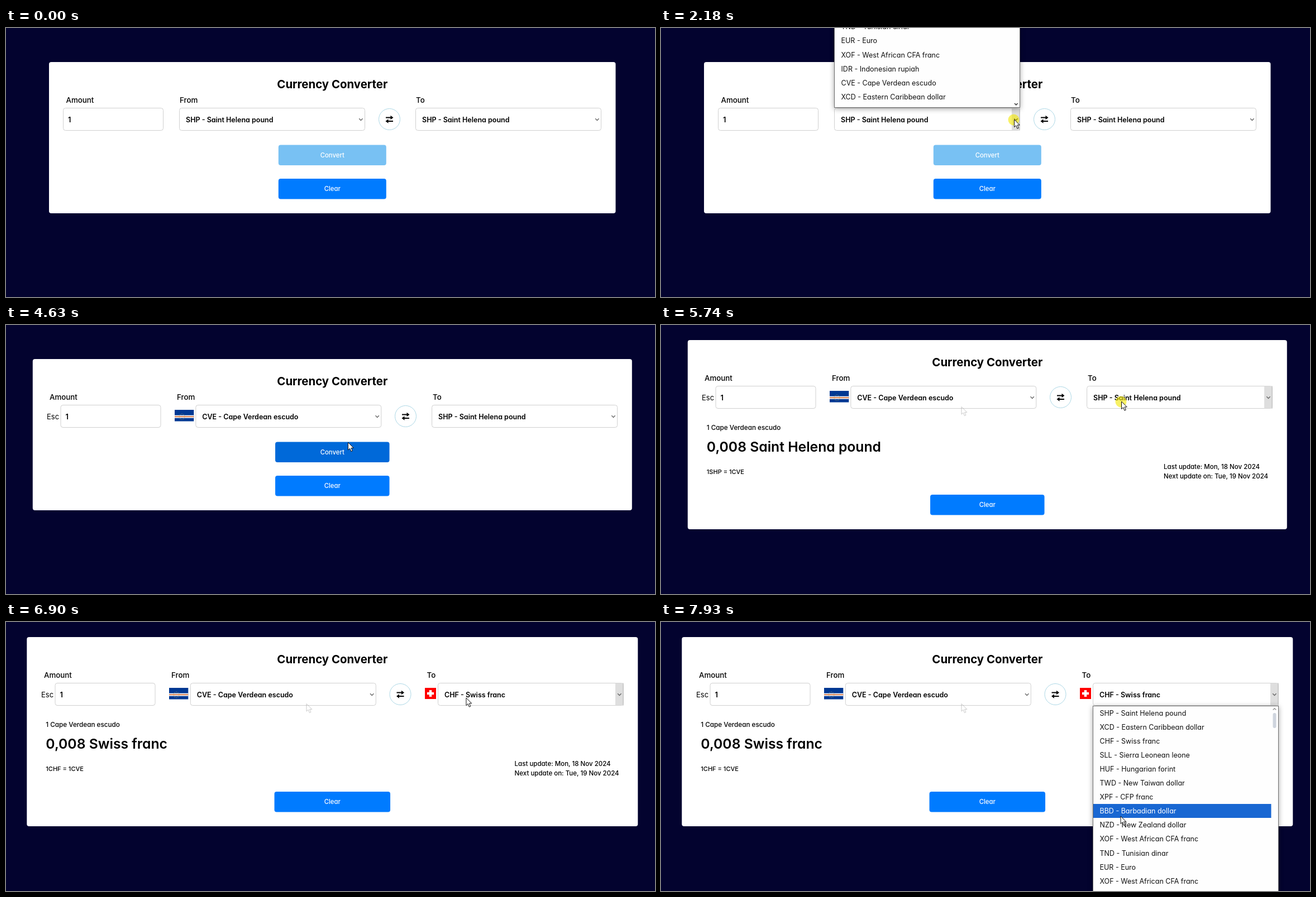
These frames come from a looping animation (1162x482 px, 8 s). An HTML page:

```html
<!DOCTYPE html>
<html lang="en">
<head>
<meta charset="utf-8">
<title>Currency Converter</title>
<style>
  html, body { margin: 0; width: 100%; height: 100%; overflow: hidden; background: #03032f; }
  #stage { display: block; width: 100%; height: 100%; }
  /* cv11 gives the single-storey a */
  text { font-family: Inter, "Open Sans", sans-serif; font-feature-settings: "cv11"; white-space: pre; }
  .menu { filter: drop-shadow(0 2px 5px rgba(0, 0, 0, .35)); }
</style>
</head>
<body>
<svg id="stage" viewBox="0 0 1162 482"></svg>
<script>
const LOOP = 8000;
const BLUE = '#007bff', BLUE_HOVER = '#0069d9', PALE = '#78c1f3';
const ROW = 25.1;

const SHP = 'SHP - Saint Helena pound', CVE = 'CVE - Cape Verdean escudo', CHF = 'CHF - Swiss franc';
const XCD = 'XCD - Eastern Caribbean dollar', XOF = 'XOF - West African CFA franc';
const TND = 'TND - Tunisian dinar', EUR = 'EUR - Euro';
const FROM_ROWS = [TND, EUR, XOF, 'IDR - Indonesian rupiah', CVE, XCD, 'LAK - Lao kip'];
const TO_ROWS = [SHP, XCD, CHF, 'SLL - Sierra Leonean leone', 'HUF - Hungarian forint',
  'TWD - New Taiwan dollar', 'XPF - CFP franc', 'BBD - Barbadian dollar',
  'NZD - New Zealand dollar', XOF, TND, EUR, XOF, 'IDR - Indonesian rupiah'];

// Horizontal layout for each selection
const PLAIN = { left: 77, right: 1091.5, amount: 107.5, input: 102.5, fromLabel: 311, from: 310.5,
  swap: 686.5, toLabel: 734, to: 733.5, button: 193, fromText: SHP, toText: SHP };
const ESCUDO = { left: 47.8, right: 1120.8, amount: 78, input: 98, fromLabel: 306, from: 339.8,
  swap: 715.5, toLabel: 764, to: 762.6, button: 204.5, fromText: CVE, toText: SHP, flag: 302 };
const FRANC = { left: 37.3, right: 1131.3, amount: 68, input: 88, fromLabel: 296, from: 330.3,
  swap: 706, toLabel: 753.5, to: 773.5, button: 207.5, fromText: CVE, toText: CHF, flag: 292, swiss: 750 };

// Pointer moves: start, end, from, bend, to
const MOVES = [
  [520, 1290, [976, 441], [640, 285], [597, 217]],
  [1290, 1980, [597, 217], [606, 180], [632.5, 164]],
  [2400, 2930, [632.5, 164], [590, 100], [520, 82]],
  [4100, 4780, [520, 82], [528, 178], [638, 222]],
  [5000, 5640, [638, 222], [740, 160], [824.5, 137]],
  [6130, 6460, [824.5, 137], [826, 170], [825.5, 208]],
  [6640, 6960, [825.5, 208], [826, 160], [823.5, 130.5]],
  [7650, 7930, [823.5, 130.5], [823, 239], [823, 348]]
];
const CLICKS = [[2050, 2250], [3600, 3730], [4780, 4910], [5670, 5880], [6500, 6630], [7240, 7450]];

const during = (t, a, b) => t >= a && t < b;
const inside = (p, x, y, w, h) => p[0] >= x && p[0] < x + w && p[1] >= y && p[1] < y + h;

function pointer(t) {
  const [a, b, p, q, r] = MOVES.filter(m => t >= m[0]).pop() || MOVES[0];
  const k = Math.max(0, Math.min(1, (t - a) / (b - a)));
  const s = k * k * (3 - 2 * k), u = 1 - s;
  return [0, 1].map(i => u * u * p[i] + 2 * u * s * q[i] + s * s * r[i]);
}

const rect = (x, y, w, h, fill, extra = '') =>
  `<rect x="${x}" y="${y}" width="${w}" height="${h}" fill="${fill}" ${extra}/>`;
// y is the middle of the capitals
const text = (str, x, y, size, weight = 400, fill = '#000', anchor = 'start') =>
  `<text x="${x}" y="${y + size * 0.36}" font-size="${size}" font-weight="${weight}" fill="${fill}" text-anchor="${anchor}">${str}</text>`;
const stroke = (d, color, width) =>
  `<path d="${d}" fill="none" stroke="${color}" stroke-width="${width}"/>`;

function field(x, y, w) {
  return rect(x, y, w, 40, '#fff', 'rx="4" stroke="#d0d0d0"');
}

function select(x, y, label, hot, pressed) {
  let s = field(x, y, 332);
  if (hot) s += rect(x + 317.5, y, 14.5, 40, '#dedede') +
    stroke(`M${x + 331.5} ${y}v40`, '#bbb', 1);
  return s + text(label, x + 11.5, y + 20.5, 12.5, 600) +
    stroke(`M${x + 321.7} ${y + 18.8}l3.2 3.2 3.2-3.2`, pressed ? '#000' : '#666', 1.3);
}

function button(label, y, w, fill) {
  return rect(584.3 - w / 2, y, w, 36.5, fill, 'rx="4"') +
    text(label, 584.3, y + 18, 11.3, 500, '#fff', 'middle');
}

function swapIcon(x, y) {
  return `<circle cx="${x}" cy="${y}" r="19" fill="#fff" stroke="#add8e6"/>` +
    stroke(`M${x - 6.5} ${y - 3}h9M${x + 6.5} ${y + 3.5}h-9`, '#000', 2) +
    `<path d="M${x + 2} ${y - 6.8}l5 3.8-5 3.8zM${x - 2} ${y - 0.3}l-5 3.8 5 3.8z"/>`;
}

function capeVerdeFlag(x, y) {
  let s = rect(x, y, 34.3, 20.5, '#003893') + rect(x, y + 9.7, 34.3, 5, '#fff') +
    rect(x, y + 11.4, 34.3, 1.7, '#cf6a35');
  for (let i = 0; i < 10; i++) {
    const a = i * Math.PI / 5;
    s += `<circle cx="${x + 13 + 5 * Math.sin(a)}" cy="${y + 12.3 - 5 * Math.cos(a)}" r=".6" fill="#c9b45a"/>`;
  }
  return s;
}

function swissFlag(x, y) {
  return rect(x, y, 20, 20, '#f00') + rect(x + 7.8, y + 4, 4.4, 12, '#fff') + rect(x + 4, y + 7.8, 12, 4.4, '#fff');
}

function menu(x, y, h, rows, first, active) {
  const list = rows.map((row, i) => {
    const top = first + i * ROW, on = i === active;
    return (on ? rect(x + 0.5, Math.round(top), 318.5, 25, '#1967d2') : '') +
      text(row, x + 12, top + ROW / 2, 12.5, 400, on ? '#fff' : '#111');
  });
  return rect(x, y, 332, h, '#fefefe', 'class="menu" stroke="#6d6d6d"') +
    `<svg width="1162" height="${y + h}">${list.join('')}</svg>`;
}

const cursor = ([x, y], alpha = 1) =>
  `<path transform="translate(${x} ${y})" opacity="${alpha}" d="M0 0V13.6L3.2 10.7 5.4 16.2 7.8 15.2 5.6 9.9H9.8Z" fill="#fff" stroke="#111" stroke-width="1" stroke-linejoin="round"/>`;

function scene(t) {
  const L = t < 3730 ? PLAIN : t < 6630 ? ESCUDO : FRANC;
  const done = t >= 4910;
  const top = done ? 27 : 61, bottom = done ? 366 : 332;
  const boxY = top + 82.5, p = pointer(t);
  const fromOpen = during(t, 2180, 3730);
  const toOpen = during(t, 5810, 6630) || t >= 7310;
  const pressed = during(t, 2180, 2250) || during(t, 5810, 6000) || during(t, 7310, 7450);
  const over = x => t >= 520 && inside(p, x, boxY, 332, 40);

  let s = rect(0, 0, 1162, 482, '#03032f') +
    rect(L.left, top, L.right - L.left, bottom - top, '#fff', 'rx="4"') +
    text('Currency Converter', 584.3, top + 40, 20.4, 700, '#000', 'middle') +
    text('Amount', L.amount, top + 68, 13.3, 500) +
    text('From', L.fromLabel, top + 68, 13.3, 500) +
    text('To', L.toLabel, top + 68, 13.3, 500) +
    field(L.input, boxY, 179) + text('1', L.input + 8.5, boxY + 20.5, 12.8, 600) +
    select(L.from, boxY, L.fromText, fromOpen || over(L.from), fromOpen && pressed) +
    swapIcon(L.swap, top + 102.5) +
    select(L.to, boxY, L.toText, toOpen || over(L.to), toOpen && pressed);
  if (L.flag) s += text('Esc', L.input - 25, top + 103, 13) + capeVerdeFlag(L.flag, top + 91);
  if (L.swiss) s += swissFlag(L.swiss, top + 91);

  const bx = 584.3 - L.button / 2;
  const hue = y => t >= 520 && !fromOpen && !toOpen && inside(p, bx, y, L.button, 36.5) ? BLUE_HOVER : BLUE;
  if (done) {
    const [code, name] = L.toText.split(' - ');
    const x = L.left + 34, dates = L.right - 220.7;
    s += text('1 Cape Verdean escudo', x, 183.5, 11.7, 500) +
      text('0,008 ' + name, x, 218.5, 24.7, 600) +
      text(`1${code} = 1CVE`, x, 263, 11, 500) +
      text('Last update: Mon, 18 Nov 2024', dates, 254, 11.5, 500) +
      text('Next update on: Tue, 19 Nov 2024', dates, 271, 11.5, 500) +
      button('Clear', 304, L.button, hue(304)) +
      cursor([538, 146.5], 0.22);
  } else {
    s += button('Convert', 209.5, L.button, L === PLAIN ? PALE : hue(209.5)) +
      button('Clear', 270, L.button, hue(270));
  }

  if (fromOpen) {
    const first = -33 + (t < 2250 ? 18.3 : 0);
    const active = t > 2400 && p[1] < 142 ? Math.floor((p[1] - first) / ROW) : -1;
    s += menu(L.from, -10, 152.5, FROM_ROWS, first, active) +
      stroke(`M${L.from + 322.5} 135l2.8 2.8 2.8-2.8`, '#444', 1.7);
  }
  if (toOpen) {
    const first = 150.5, x = L.to;
    const active = p[1] > first ? Math.floor((p[1] - first) / ROW) : TO_ROWS.indexOf(L.toText);
    s += menu(x, 150.5, 345, TO_ROWS, first, active) +
      stroke(`M${x + 322.2} 157.5l2.8-2.8 2.8 2.8`, '#999', 1.5) +
      rect(x + 322, 163, 6, 27, '#cfd5de', 'rx="3"');
  }

  if (CLICKS.some(([a, b]) => during(t, a, b)))
    s += `<circle cx="${p[0] - 1}" cy="${p[1] + 0.5}" r="10" fill="#f4e800" opacity=".6"/>`;
  if (t >= 520) s += cursor(p);
  return s;
}

const stage = document.getElementById('stage');
let last = '';
function draw() {
  const next = scene(performance.now() % LOOP);
  if (next !== last) stage.innerHTML = last = next;
  requestAnimationFrame(draw);
}
draw();
</script>
</body>
</html>
```
